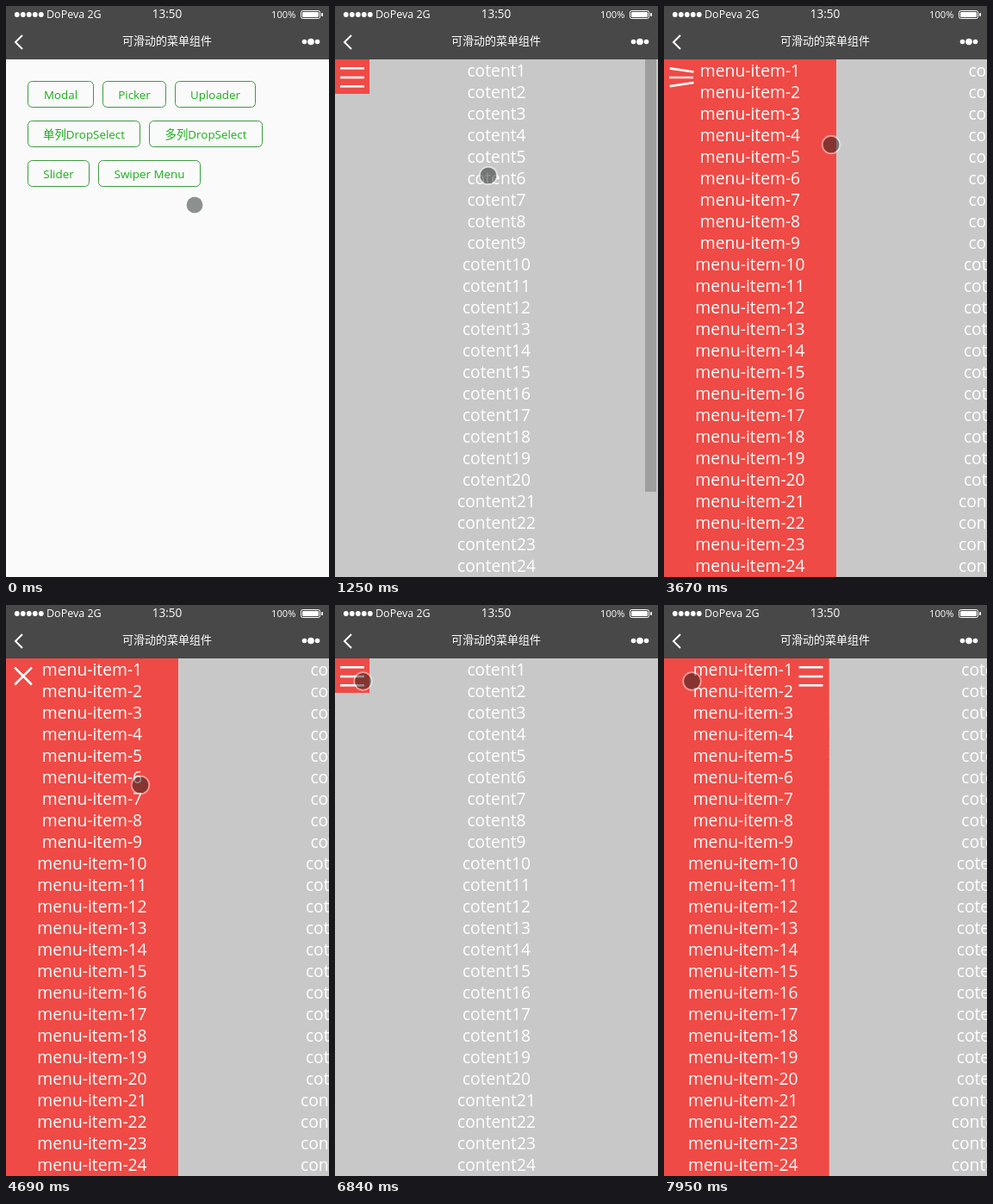
These frames come from a looping animation (375x663 px, 8 s). An HTML page:

```html
<!DOCTYPE html>
<html lang="zh">
<head>
<meta charset="utf-8">
<style>
html, body { margin: 0; width: 100%; height: 100%; overflow: hidden; background: #fafafa; }
svg { display: block; width: 375px; height: 663px; font-family: "Open Sans", "Noto Sans CJK SC", "Noto Sans CJK", sans-serif; }
.mid { text-anchor: middle; }
.rows { font-size: 19.3px; font-weight: 500; fill: #fff; }
.home { font-size: 13.4px; fill: #1aad19; }
.home rect { fill: none; stroke: #3d9a41; }
.bar { fill: #fff; font-size: 12.5px; font-weight: 500; }
.icon { stroke: #fff; stroke-width: 2.6; }
</style>
</head>
<body>
<svg viewBox="0 0 375 663">
  <clipPath id="screen"><rect width="375" height="663"/></clipPath>
  <rect width="375" height="663" fill="#fafafa"/>
  <g id="home" class="home mid"></g>
  <g id="page" clip-path="url(#screen)">
    <g id="body">
      <rect y="62" width="375" height="601" fill="#c8c8c8"/>
      <g id="contents" class="rows mid"></g>
    </g>
    <g id="menu">
      <rect y="62" width="200" height="601" fill="#ef4a45"/>
      <g id="items" class="rows mid"></g>
    </g>
    <g id="button">
      <rect y="62" width="40" height="40" fill="#ef4a45"/>
      <g class="icon">
        <path id="top" d="M0 0H28"/>
        <path id="middle" d="M6 83H34"/>
        <path id="bottom" d="M0 0H28"/>
      </g>
    </g>
    <rect id="scroll" x="360" y="62" width="13" height="502" fill="#9e9e9e"/>
  </g>
  <g class="bar">
    <rect width="375" height="62" fill="#484848"/>
    <g id="signal"></g>
    <text x="47" y="13.5">DoPeva 2G</text>
    <text class="mid" x="187" y="13.5" font-size="13.6">13:50</text>
    <text x="308" y="14" font-size="11.2">100%</text>
    <rect x="342.5" y="5.5" width="22" height="9" rx="2" fill="none" stroke="#fff"/>
    <rect x="344" y="7" width="19" height="6" rx="1"/>
    <rect x="366" y="8" width="2" height="4" rx="1"/>
    <path d="M19 34L11 42L19 50" fill="none" stroke="#fff" stroke-width="2"/>
    <text class="mid" x="187" y="45" font-size="13">可滑动的菜单组件</text>
    <circle cx="346.5" cy="41.5" r="2.8"/>
    <circle cx="354" cy="41.5" r="3.8"/>
    <circle cx="361.5" cy="41.5" r="2.8"/>
  </g>
  <g id="cursor">
    <circle r="9.5" fill="rgba(20,30,25,.48)"/>
    <circle r="10.3" fill="none" stroke="rgba(255,255,255,.45)" stroke-width="1.8"/>
  </g>
</svg>
<script>
const $ = id => document.getElementById(id);
const LOOP = 8000, WIDTH = 200;

// static parts
const buttons = [
  [25, 87, 77, 'Modal'], [112, 87, 74, 'Picker'], [196, 87, 94, 'Uploader'],
  [25, 133, 131, '单列DropSelect'], [166, 133, 132, '多列DropSelect'],
  [25, 179, 72, 'Slider'], [107, 179, 119, 'Swiper Menu']
];
$('home').innerHTML = buttons.map(([x, y, w, label]) =>
  `<rect x="${x + .5}" y="${y + .5}" width="${w - 1}" height="30" rx="5"/>` +
  `<text x="${x + w / 2}" y="${y + 20.5}">${label}</text>`).join('');

const rows = (x, label) => Array.from({ length: 24 }, (_, i) =>
  `<text x="${x}" y="${82 + 25 * i}">${label(i + 1)}</text>`).join('');
$('contents').innerHTML = rows(187.5, n => (n > 20 ? 'content' : 'cotent') + n);
$('items').innerHTML = rows(100, n => 'menu-item-' + n);
$('signal').innerHTML = [0, 1, 2, 3, 4].map(i =>
  `<circle cx="${12.8 + 7 * i}" cy="10" r="2.9"/>`).join('');

// pointer path: time, x, y
const path = [
  [0, 219, 231], [40, 219, 231], [320, 178, 197], [1510, 178, 197], [1970, 26, 85],
  [2150, 26, 85], [2670, 126, 123], [3010, 126, 123], [3130, 135, 126],
  [3670, 194, 161], [3810, 200, 166], [3870, 200, 166], [4140, 301, 225],
  [4370, 164, 210], [4480, 164, 210], [4690, 156, 209], [4880, 156, 209],
  [4990, 146, 209], [5270, 144.5, 208.5], [6270, 144.5, 208.5], [6840, 32.5, 88.5], [LOOP, 32.5, 88.5]
];

const clamp = v => Math.max(0, Math.min(1, v));
const mix = (a, b, k) => a + (b - a) * k;

// the CSS "ease" curve
function ease(p) {
  if (p <= 0 || p >= 1) return clamp(p);
  const bez = (a, b, s) => 3 * a * s * (1 - s) ** 2 + 3 * b * s * s * (1 - s) + s ** 3;
  let lo = 0, hi = 1;
  for (let i = 0; i < 20; i++) {
    const s = (lo + hi) / 2;
    if (bez(.25, .25, s) < p) lo = s; else hi = s;
  }
  return bez(.1, 1, lo);
}
const run = (t, start, time) => ease((t - start) / time);

function pointer(t) {
  const i = path.findIndex(k => k[0] > t);
  const [t0, x0, y0] = path[i - 1], [t1, x1, y1] = path[i];
  const k = (t - t0) / (t1 - t0);
  return [mix(x0, x1, k), mix(y0, y1, k)];
}

// 0 closed, 1 open; closing stalls until 5520, then catches up
function menuOpen(t) {
  const closed = t < 5520 ? 0 : run(t, 5276, 350);
  return run(t, 3260, 350) - closed + run(t, 7690, 350);
}

// 1 when the button sits on the menu, 0 when it sticks out to its right
const buttonIn = t =>
  1 - run(t, 1150, 100) + run(t, 3020, 100) - run(t, 4890, 100) + run(t, 7935, 100);

const move = (id, x, y = 0, turn = 0) =>
  $(id).setAttribute('transform', `translate(${x} ${y}) rotate(${turn})`);

function draw(t) {
  const shift = WIDTH * menuOpen(t);
  const cross = run(t, 3610, 400) - run(t, 5640, 430);
  move('page', 375 * (1 - run(t, 750, 210)));
  move('body', shift);
  move('menu', shift - WIDTH);
  move('button', shift - WIDTH * buttonIn(t));
  $('scroll').style.display = t < 3050 ? '' : 'none';

  const left = mix(6, 10.1, cross);
  move('top', left, mix(72.3, 72.7, cross), 45 * cross);
  move('bottom', left, mix(93.3, 92.5, cross), -45 * cross);
  $('middle').style.opacity = 1 - cross;
  move('cursor', ...pointer(t));
}

function frame() {
  draw(performance.now() % LOOP);
  requestAnimationFrame(frame);
}
frame();
</script>
</body>
</html>
```
